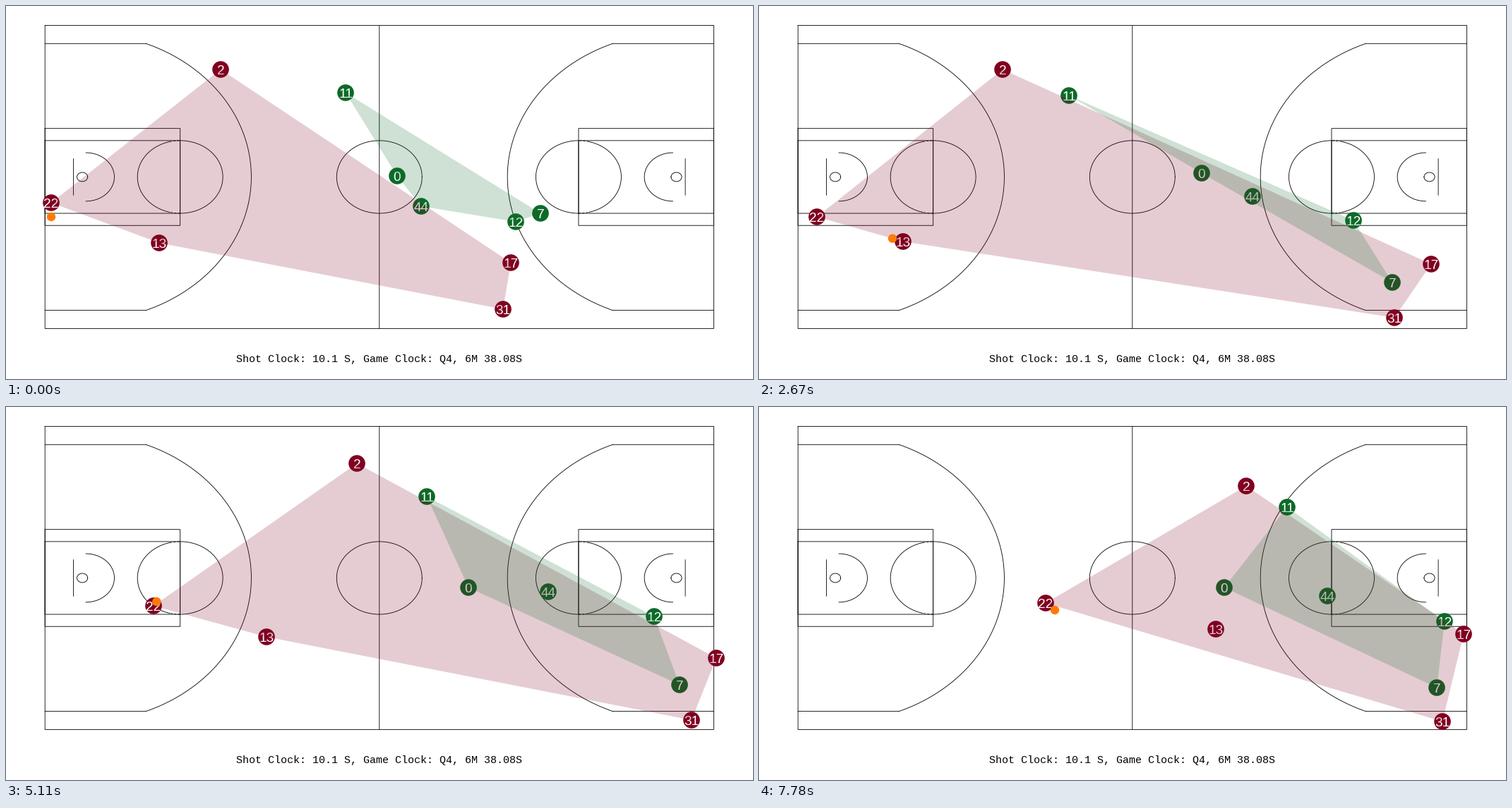
A matplotlib script for the animation above (8 s loop, 1058 px wide and 529 px high).

```python
import numpy as np
import matplotlib.pyplot as plt
from matplotlib.animation import FuncAnimation
from matplotlib.patches import Circle, Polygon

W, H, DPI = 1058, 529, 100
STEPS, LOOP_MS, TICK_MS = 36, 8000, 40
TICKS = LOOP_MS // TICK_MS
PX = 72 / DPI                      # one pixel in points
GREEN, MAROON, ORANGE = "#0d6a28", "#800020", "#ff7a08"

# Court of 94 x 50 feet, placed in pixels
LEFT, TOP, RIGHT, BOTTOM = 55.2, 27.5, 1002.4, 457.4
SX, SY = (RIGHT - LEFT) / 94, (BOTTOM - TOP) / 50

# Each player runs a smooth curve through one waypoint per key step
KEY_STEPS = [0, 8, 12, 23, 35]
GREENS = {
    "11": [(481, 123), (422, 128), (439, 127), (596, 127), (748, 142)],
    "0": [(554, 241), (604, 236), (627, 237), (655, 256), (659, 256)],
    "44": [(588, 284), (666, 273), (699, 270), (768, 262), (805, 268)],
    "12": [(722, 306), (808, 309), (842, 304), (918, 297), (971, 304)],
    "7": [(757, 294), (867, 373), (897, 392), (954, 394), (960, 398)],
}
MAROONS = {
    "2": [(304, 90), (307, 90), (345, 90), (497, 80), (690, 112)],
    "22": [(64, 279), (61, 308), (82, 299), (209, 282), (406, 278)],
    "13": [(217, 336), (201, 334), (204, 334), (369, 326), (647, 315)],
    "17": [(715, 364), (896, 374), (952, 366), (1006, 356), (998, 322)],
    "31": [(704, 430), (853, 439), (900, 442), (971, 444), (968, 446)],
}


def path(points):
    """Cubic Hermite curve through the waypoints, sampled at every step."""
    k, p = np.array(KEY_STEPS, float), np.array(points, float)
    slope = np.gradient(p, k, axis=0)
    t = np.arange(STEPS)
    i = np.clip(np.searchsorted(k, t, side="right") - 1, 0, len(k) - 2)
    d = (k[i + 1] - k[i])[:, None]
    u = (t - k[i])[:, None] / d
    return ((1 + 2 * u) * (1 - u) ** 2 * p[i]
            + u * (1 - u) ** 2 * d * slope[i]
            + u ** 2 * (3 - 2 * u) * p[i + 1]
            + u ** 2 * (u - 1) * d * slope[i + 1])


def ball_route(passer, mate):
    """The passer throws to the mate, gets the ball back and dribbles on."""
    t = np.arange(STEPS)
    share = np.interp(t, [7, 12.7, 15, 18.5], [0, 1, 1, 0])[:, None]
    dx = np.interp(t, [17, 35], [0, 13])
    dy = np.interp(t, [0, 7, 13, 17, 35], [20, 0, 0, -14, 10])
    return passer + share * (mate - passer) + np.column_stack([dx, dy])


def hull(points):
    """Convex hull by monotone chain."""
    pts = sorted(map(tuple, points))

    def half(seq):
        out = []
        for x, y in seq:
            while len(out) > 1:
                (x0, y0), (x1, y1) = out[-2:]
                if (x1 - x0) * (y - y0) > (y1 - y0) * (x - x0):
                    break
                out.pop()
            out.append((x, y))
        return out[:-1]

    return half(pts) + half(pts[::-1])


fig = plt.figure(figsize=(W / DPI, H / DPI), dpi=DPI, facecolor="white")
ax = fig.add_axes([0, 0, 1, 1])
ax.set_xlim(0, W)
ax.set_ylim(H, 0)
ax.axis("off")


def line(x, y, flip=False, **style):
    x, y = np.asarray(x, float), np.asarray(y, float)
    x = 94 - x if flip else x
    ax.plot(LEFT + x * SX, TOP + y * SY, color="black", lw=0.85 * PX,
            snap=False, zorder=1, **style)


def box(x0, y0, x1, y1, flip=False):
    line([x0, x1, x1, x0, x0], [y0, y0, y1, y1, y0], flip)


def arc(cx, r, a0=0, a1=360, flip=False, **style):
    a = np.radians(np.linspace(a0, a1, 120))
    line(cx + r * np.cos(a), 25 + r * np.sin(a), flip, **style)


def draw_court():
    box(0, 0, 94, 50)
    line([47, 47], [0, 50])
    arc(47, 6)
    reach = np.degrees(np.arcsin(22 / 23.75))
    corner = 5.25 + np.sqrt(23.75 ** 2 - 22 ** 2)
    for flip in (False, True):
        box(0, 17, 19, 33, flip)
        box(0, 19, 19, 31, flip)
        arc(19, 6, -90, 90, flip)
        arc(19, 6, 104, 256, flip)
        for a in (90, 256):
            arc(19, 6, a, a + 14, flip, dashes=(4, 2))
        arc(5.25, 0.75, flip=flip)
        arc(5.75, 4, -90, 90, flip)
        line([4, 4], [22, 28], flip)
        for y in (3, 47):
            line([0, corner], [y, y], flip)
        arc(5.25, 23.75, -reach, reach, flip)


class Team:
    def __init__(self, players, color, area_z):
        self.paths = {name: path(points) for name, points in players.items()}
        self.dots = [ax.add_patch(Circle((0, 0), 11.8, fc=color, lw=0, zorder=2))
                     for _ in players]
        self.labels = [ax.text(0, 0, name, color="white", size=19 * PX,
                               family="Liberation Sans", ha="center",
                               va="baseline", zorder=3) for name in players]
        self.area = ax.add_patch(Polygon([(0, 0)] * 3, fc=color, alpha=0.2,
                                         lw=0, zorder=area_z))

    def move(self, step):
        spots = [p[step] for p in self.paths.values()]
        for (x, y), dot, label in zip(spots, self.dots, self.labels):
            dot.center = x, y
            label.set_position((x, y + 6.8))
        self.area.set_xy(hull(spots))


draw_court()
maroon = Team(MAROONS, MAROON, 4)
green = Team(GREENS, GREEN, 5)
ball = ax.add_patch(Circle((0, 0), 6.2, fc=ORANGE, lw=0, zorder=6))
ball_path = ball_route(maroon.paths["22"], maroon.paths["13"])
ax.text(W / 2, 505, "Shot Clock: 10.1 S, Game Clock: Q4, 6M 38.08S",
        family="Liberation Mono", size=15.04 * PX, color="black",
        ha="center", va="baseline")


def update(tick):
    # Positions are held between steps
    step = min((tick + 1) * STEPS // TICKS, STEPS - 1)
    maroon.move(step)
    green.move(step)
    ball.center = ball_path[step]
    return []


anim = FuncAnimation(fig, update, frames=TICKS, init_func=lambda: update(0),
                     interval=TICK_MS, repeat=True, repeat_delay=0)
plt.show()
```
